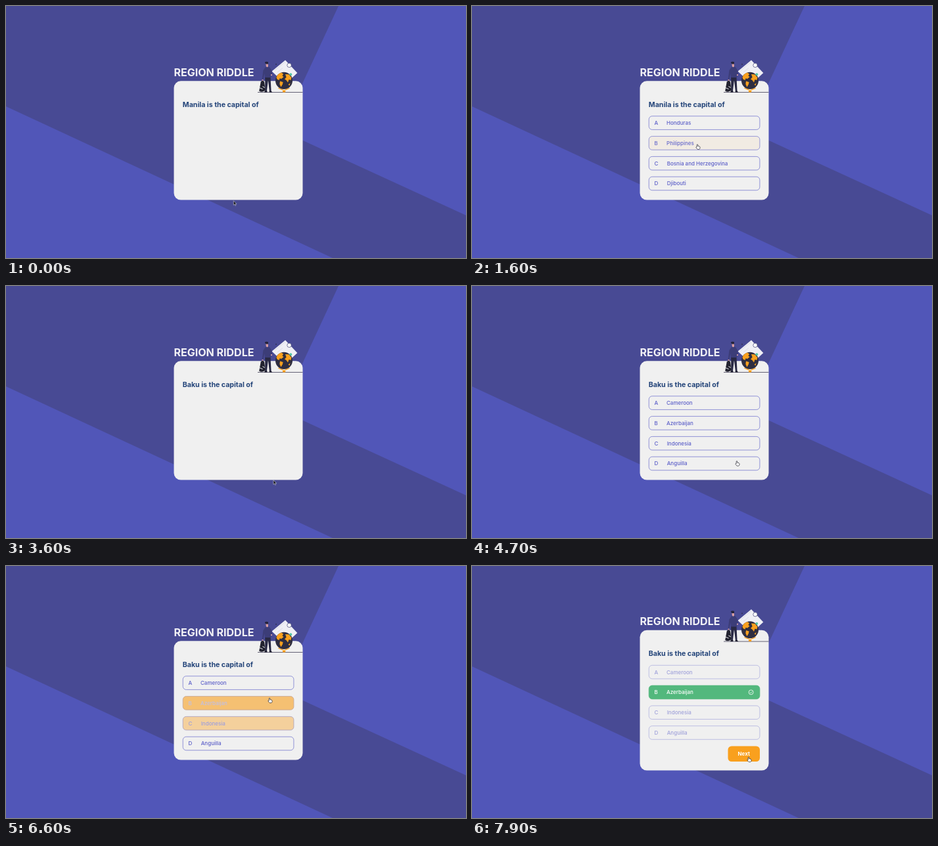
An HTML page for the animation above (8 s loop, 700 by 384 pixels).

```html
<!DOCTYPE html>
<html lang="en">
<head>
<meta charset="utf-8">
<title>Quiz</title>
<style>
  html, body { margin: 0; width: 100%; height: 100%; overflow: hidden; background: #484a94; }
  svg { display: block; width: 100vw; height: 100vh; }
  text { font-family: Inter, "Open Sans", sans-serif; }
</style>
</head>
<body>
<svg id="stage" viewBox="0 0 700 384">
  <rect width="700" height="384" fill="#484a94"/>
  <path d="M506 0H700V319L417.9 189.3Z M0 153L497 384H0Z" fill="#5156b8"/>
  <g id="panel">
    <text x="255.5" y="106.6" font-size="16" font-weight="700" fill="#f2f2f6">REGION RIDDLE</text>
    <rect id="card" x="255.5" y="114.3" width="196" height="181.2" rx="10.5" fill="#f0f0f0"/>
    <g id="art">
      <path d="M404.5 99.5L425 82.5 443.3 102 425 119Z" fill="#efeff5"/>
      <path d="M409 98L425 85M413 101L421 94.5" stroke="#d4d4e2" stroke-width=".7"/>
      <circle cx="431" cy="90.3" r="3.2" fill="#fff" stroke="#3c3d70" stroke-width=".7"/>
      <circle cx="411" cy="88.7" r="1" fill="#34345c"/>
      <path d="M383 131.5H451.5" stroke="#3f3d56" stroke-width=".8"/>
      <path d="M421 125H425.2V131.5H421Z M414 125.4Q423 131 432 125.4L431.2 124.4Q423 129 414.8 124.4Z" fill="#f9a01e"/>
      <circle cx="423" cy="113.8" r="13" fill="#2f2e41"/>
      <path d="M411.5 108.5Q414 102.8 419 101.6L422 103.5 420.5 106.5 422.6 108 419 111 416.5 110.2 415.6 113 412.4 111.5Z
               M425 104L430.4 104.2 434.4 109 433.4 113 430.6 112 429 116.5 426.4 113 424 111.4 426.6 108.5Z
               M417 114.5L421.6 116 420.8 119.6 418.4 123.4 416.4 119Z M429.6 119.4L432.6 117.6 431.4 121.4Z" fill="#f9a01e"/>
      <circle cx="433.3" cy="104.2" r="1.9" fill="#4fc4a4"/>
      <path d="M394.2 107H402.4L403.6 130H400.9L398.9 113 396.9 130H394.2Z" fill="#292944"/>
      <path d="M393.4 131.4V129.8L397.4 129.2V131.4Z M400.7 131.4V129.4H403.4L405.4 131.4Z" fill="#1b1b2c"/>
      <path d="M395 93Q398 91.4 400.8 93L404.4 98 405 104 402.9 104.4 402.5 109H394.2L393.4 103 391.4 112.4 389.7 112 391.4 98Z" fill="#3c3d78"/>
      <path d="M395.4 88H398.9V92.4L397.3 93.2 395.9 92.2Z M389.6 112H391.5V114.2H389.8Z M403 104.3H405V106H403Z" fill="#dca0a2"/>
      <path d="M393.8 86.2Q395 83.8 399 85.3V88.4H395.5Z" fill="#24243c"/>
      <path d="M387.8 115.4Q390.4 112 393 115.4L394.8 128.6Q390 132.4 385.2 129.4Z" fill="#22222f"/>
      <path d="M385.7 124.6L390.6 126.6M390.4 122.6L393.9 124.3" stroke="#efeff4" stroke-width="1"/>
    </g>
    <text id="ask" x="268.8" y="153.8" font-size="10.6" font-weight="700" fill="#234479"></text>
    <g id="list"></g>
    <g id="next">
      <rect x="389.5" y="291" width="48.5" height="23.6" rx="5.5" fill="#f9a01e"/>
      <text x="413.7" y="305.8" font-size="8" font-weight="700" fill="#fff" text-anchor="middle">Next</text>
    </g>
  </g>
  <path id="arrow" d="M0 0V6.6L1.6 5.2 2.6 7.5 3.7 7 2.7 4.8H4.6Z" fill="#15151d" stroke="#fff" stroke-width=".45"/>
  <path id="hand" d="M-.8 4.3V.6Q0 -.5 .8 .6V2.7Q3.7 2.6 4 4.2V5.5Q3.8 7.3 2.8 7.6H.2Q-1 6.5 -2.2 4.6 -1.8 3.6 -.8 4.3Z" fill="#fff" stroke="#22222c" stroke-width=".7"/>
</svg>
<script>
const LOOP = 8000;
const PAPER = [240, 240, 240], ORANGE = [249, 160, 30], GREEN = [83, 184, 125];
const VIOLET = [91, 94, 200], WHITE = [255, 255, 255];

// Times in ms: show = options fade in, shown = answer revealed, end = next question.
const rounds = [
  { ask: "Manila is the capital of", names: ["Honduras", "Philippines", "Bosnia and Herzegovina", "Djibouti"],
    show: 600, shown: 2400, end: 3400, hover: { 1: [1570, 9000] } },
  { ask: "Baku is the capital of", names: ["Cameroon", "Azerbaijan", "Indonesia", "Anguilla"],
    show: 4150, shown: 7100, end: LOOP, hover: { 1: [6300, 9000], 2: [4780, 6300] } }
];

// Pointer stops: time, x, y
const stops = [
  [0, 346.3, 296.8], [1080, 346.3, 296.8], [1550, 343, 210.8], [2000, 343, 209.6], [2550, 343, 209.6],
  [3050, 407, 295.8], [4450, 407, 295.8], [4950, 399, 237.6], [6100, 399, 237.6], [6500, 401, 201],
  [7250, 401, 201], [7850, 421, 291], [LOOP, 421, 291]
];
const handTimes = [[1500, 2260], [2930, 3400], [4640, 7000], [7740, LOOP]];

const $ = id => document.getElementById(id);
const clamp = v => Math.max(0, Math.min(1, v));
const ramp = (t, from, span) => clamp((t - from) / span);
const ease = u => u * u * (3 - 2 * u);
const blend = (a, b, u) => a.map((v, i) => v + (b[i] - v) * u);
const rgb = c => `rgb(${c.map(Math.round)})`;

function add(parent, tag, attrs, text = "") {
  const el = document.createElementNS("http://www.w3.org/2000/svg", tag);
  set(el, attrs);
  el.textContent = text;
  return parent.appendChild(el);
}
function set(el, attrs) {
  for (const k in attrs) el.setAttribute(k, attrs[k]);
}

const rows = [..."ABCD"].map((letter, i) => {
  const mid = 178.1 + i * 30.8;
  const g = add($("list"), "g", {});
  const type = { y: mid + 2.9, "font-size": 8, "font-weight": 500 };
  const box = add(g, "rect", { x: 269.2, y: mid - 10.3, width: 168.7, height: 20.6, rx: 5, "stroke-width": .8 });
  const label = add(g, "text", { x: 277.6, ...type }, letter);
  const name = add(g, "text", { x: i < 2 ? 296 : 296.7, ...type });
  const tick = add(g, "path", {
    d: `M428.1 ${mid}a3.5 3.5 0 1 1 -7 0a3.5 3.5 0 1 1 7 0M422.9 ${mid}l1.2 1.3 2.2 -2.3`,
    fill: "none", stroke: "#fff", "stroke-width": .8
  });
  return { g, box, label, name, tick };
});

function pointer(t) {
  const i = Math.max(1, stops.findIndex(s => s[0] > t));
  const [a, b] = [stops[i - 1], stops[i]];
  return blend(a.slice(1), b.slice(1), ease(ramp(t, a[0], b[0] - a[0])));
}

function draw(t) {
  const round = rounds.find(r => t < r.end);
  const open = t >= round.shown;
  const done = ramp(t, round.shown, 450);

  set($("panel"), { transform: `translate(0 ${open ? -16.5 : 0})` });
  set($("card"), { height: open ? 213.8 : 181.2 });
  set($("next"), { opacity: open ? ramp(t, round.shown, 200) : 0 });
  $("ask").textContent = round.ask;

  rows.forEach((row, i) => {
    const right = i === 1;
    const [over, out] = round.hover[i] || [9000, 9000];
    const hot = ramp(t, over, 500) - ramp(t, out, 500);
    const tint = blend(PAPER, ORANGE, hot);
    const fill = right ? blend(tint, GREEN, done) : tint;
    const ink = rgb(blend(VIOLET, WHITE, hot));
    const shade = right || !open ? 1 : 1 - .47 * done;
    set(row.g, { opacity: ramp(t, round.show + i * 90, 250) * shade });
    set(row.box, { fill: rgb(fill), stroke: rgb(blend(blend(VIOLET, PAPER, .2), fill, hot)) });
    set(row.label, { fill: ink });
    set(row.name, { fill: ink });
    set(row.tick, { opacity: right && open ? done : 0 });
    row.name.textContent = round.names[i];
  });

  const [x, y] = pointer(t);
  const hand = handTimes.some(([a, b]) => t >= a && t < b);
  set($("arrow"), { transform: `translate(${x} ${y})`, opacity: hand ? 0 : 1 });
  set($("hand"), { transform: `translate(${x} ${y})`, opacity: hand ? 1 : 0 });
}

const start = performance.now();
function tick() {
  draw((performance.now() - start) % LOOP);
  requestAnimationFrame(tick);
}
tick();
</script>
</body>
</html>
```
